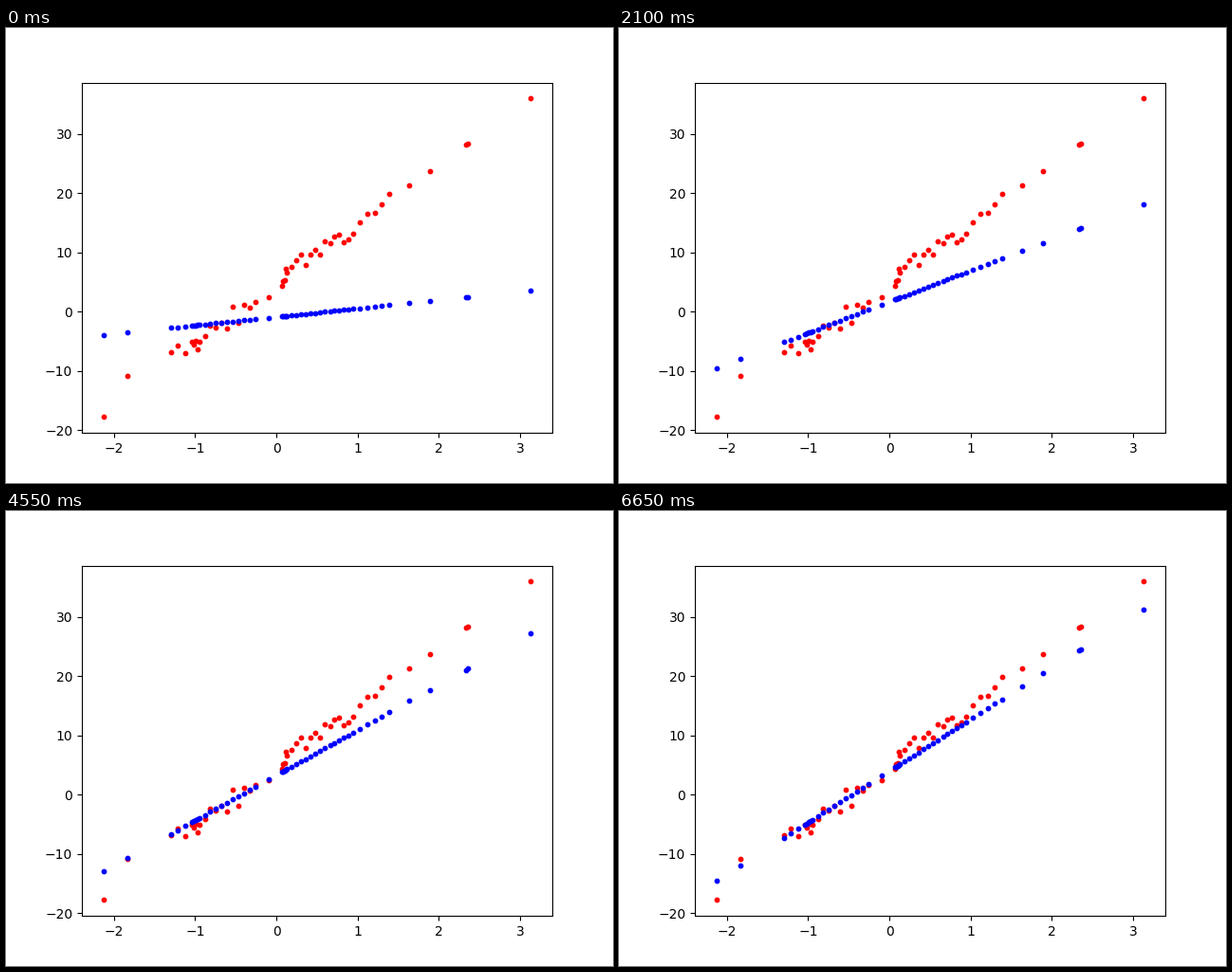
Write a matplotlib script that moves like this. It is 640 px wide and 480 px high and loops after 7 s.

```python
import numpy as np
import matplotlib.pyplot as plt
from matplotlib.animation import FuncAnimation

FRAMES, INTERVAL = 20, 350
COUNT = 50

# Key samples: rank along x, then x and y
KEYS = np.array([
    (0, -2.13, -17.7), (1, -1.83, -10.8), (2, -1.3, -6.8), (5, -1.04, -5.0),
    (9, -0.95, -5.0), (19, -0.26, 1.7), (21, 0.07, 4.4), (25, 0.13, 6.6),
    (27, 0.24, 8.7), (34, 0.66, 11.6), (39, 0.94, 13.2), (44, 1.39, 19.9),
    (46, 1.89, 23.7), (47, 2.33, 28.2), (48, 2.36, 28.4), (49, 3.13, 36.0)])

# Fitted line: starting error shrinks by a constant factor each step
TARGET = np.array([10.04, 4.93])
ERROR = np.array([8.61, 5.80])
DECAY = 0.9066


def make_samples():
    """Fill in between the key samples, with noise on the filled ones."""
    rank = np.arange(COUNT)
    key_rank, key_x, key_y = KEYS.T
    noise = np.random.default_rng(4).normal(0, 0.8, COUNT)
    noise[key_rank.astype(int)] = 0
    x = np.interp(rank, key_rank, key_x)
    y = np.interp(rank, key_rank, key_y) + noise
    return x, y


def predict(step):
    slope, bias = TARGET - ERROR * DECAY ** step
    return slope * xs + bias


xs, ys = make_samples()
fig, ax = plt.subplots(figsize=(6.4, 4.8), dpi=100)
ax.scatter(xs, ys, s=10, color="red")
fit = ax.scatter(xs, predict(0), s=10, color="blue")
ax.set_xlim(-2.3945, 3.3985)
ax.set_ylim(-20.455, 38.685)


def update(step):
    fit.set_offsets(np.column_stack([xs, predict(step)]))
    return fit,


anim = FuncAnimation(fig, update, frames=FRAMES, interval=INTERVAL,
                     repeat=True, repeat_delay=0)
plt.show()
```
